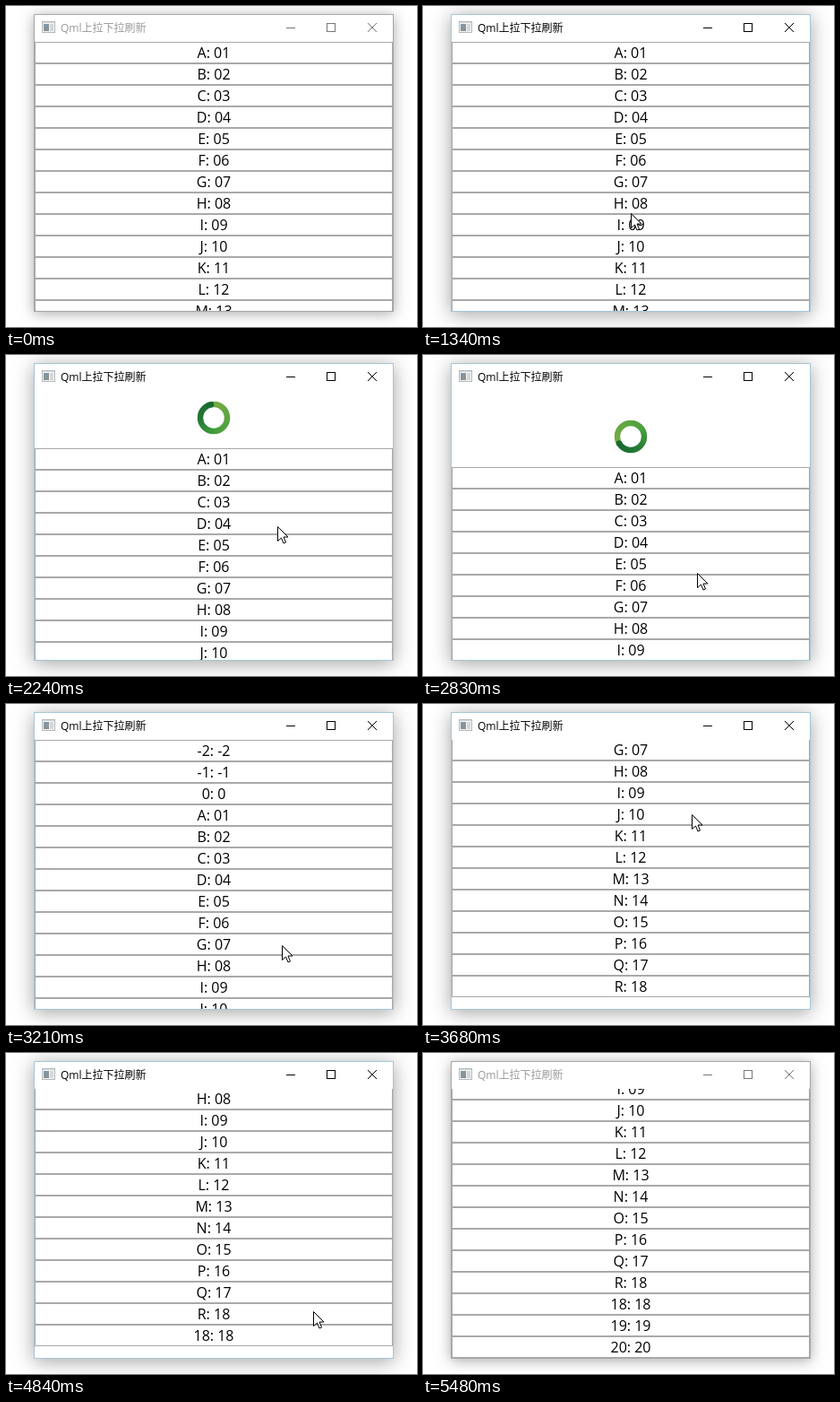
Recreate the animation shown at these times as an HTML page with a canvas. Size 459 px wide and 358 px high, loop 5530 ms.

```html
<!DOCTYPE html>
<html lang="zh">
<head>
<meta charset="utf-8">
<title>Pull to refresh</title>
<style>
html, body { margin: 0; width: 100%; height: 100%; overflow: hidden; background: #fff; }
canvas { display: block; }
</style>
</head>
<body>
<canvas id="stage" width="459" height="358"></canvas>
<script>
const ctx = document.getElementById('stage').getContext('2d');
const LOOP = 5530, ROW = 24, TOP = 40, BOTTOM = 340, MID = 232, PULL = 64;
const PREPEND = 3060, APPEND = 4760;

// Places where the pointer turns: time, x, y.
const TURNS = [
  [60, 325, 297], [610, 173, 58], [720, 190, 24], [1340, 232, 231],
  [1800, 255, 310], [2240, 303, 191], [3210, 308, 269], [3650, 300, 120],
  [3990, 286, 254], [4420, 300, 42], [4840, 343, 288], [5100, 352, 360]
];

const range = (n, make) => Array.from({ length: n }, (_, i) => make(i));
const letters = range(18, i =>
  String.fromCharCode(65 + i) + ': ' + String(i + 1).padStart(2, '0'));
const older = range(3, i => `${i - 2}: ${i - 2}`);
const newer = range(3, i => `${i + 18}: ${i + 18}`);

function ease(t, start, end) {
  const p = Math.min(1, Math.max(0, (t - start) / (end - start)));
  return p * p * (3 - 2 * p);
}

const bump = (t, start, end) => Math.sin(Math.PI * ease(t, start, end));

// Negative values pull the list down below the header spinner.
function scrollAt(t) {
  if (t < 3020) {
    return -PULL * ease(t, 1380, 1860) - 40 * bump(t, 1550, 2100) - 46 * bump(t, 2460, 2950);
  }
  if (t < APPEND) {
    return -PULL * (1 - ease(t, 3020, 3150)) + 272 * ease(t, 3270, 3850) + 14 * bump(t, 3650, 3980);
  }
  return 241 + 35 * ease(t, 4880, 4980);
}

function rowsAt(t) {
  const rows = t >= PREPEND ? older.concat(letters) : letters;
  const added = t >= 4900 ? 3 : t >= APPEND ? 1 : 0;
  return rows.concat(newer.slice(0, added));
}

function box(x, y, w, h, color) {
  ctx.fillStyle = color;
  ctx.fillRect(x, y, w, h);
}

function frame(x, y, w, h, color) {
  ctx.strokeStyle = color;
  ctx.strokeRect(x + 0.5, y + 0.5, w - 1, h - 1);
}

function line(x1, y1, x2, y2) {
  ctx.beginPath();
  ctx.moveTo(x1, y1);
  ctx.lineTo(x2, y2);
  ctx.stroke();
}

function drawIcon() {
  box(40, 17, 15, 13, '#b4b8ba');
  box(41, 18, 13, 11, '#f3f4f5');
  box(41, 18, 13, 1, '#d3dade');
  const shade = ctx.createLinearGradient(42, 20, 47, 28);
  shade.addColorStop(0, '#7f9bb0');
  shade.addColorStop(1, '#8f8f86');
  box(42, 20, 6, 8, shade);
  box(49, 20, 4, 8, '#d5d8da');
}

function drawWindow(active) {
  ctx.save();
  ctx.shadowColor = `rgba(0,0,0,${active ? 0.36 : 0.34})`;
  ctx.shadowBlur = active ? 20 : 14;
  ctx.shadowOffsetY = active ? 3 : 2;
  box(31, 9, 402, 332, '#fff');
  ctx.restore();
  frame(31, 9, 402, 332, active ? '#a5c6d8' : '#a6a6a6');
  drawIcon();

  ctx.font = '12px "Open Sans", "Noto Sans CJK SC", "Noto Sans CJK", sans-serif';
  ctx.textAlign = 'left';
  ctx.fillStyle = active ? '#000' : '#999';
  ctx.fillText('Qml上拉下拉刷新', 61, 29);

  frame(358, 19, 10, 10, active ? '#000' : '#777');
  line(313, 24.5, 323, 24.5);
  line(404, 19, 414, 29);
  line(414, 19, 404, 29);
}

function drawSpinner(y, t) {
  const degrees = (t - 2240) * 0.4257 - 102;
  const turn = degrees * Math.PI / 180;
  const radius = 15;
  const tint = ctx.createConicGradient(turn, MID, y);
  tint.addColorStop(0, '#79ad45');
  tint.addColorStop(0.5, '#48a03d');
  tint.addColorStop(0.75, '#267a35');
  tint.addColorStop(1, '#176a30');
  ctx.lineWidth = 6.5;
  ctx.strokeStyle = tint;
  ctx.beginPath();
  ctx.arc(MID, y, radius, 0, Math.PI * 2);
  ctx.stroke();
  // Rounded dark head.
  ctx.fillStyle = '#176a30';
  ctx.beginPath();
  ctx.arc(MID + radius * Math.cos(turn), y + radius * Math.sin(turn), 3.25, 0, Math.PI * 2);
  ctx.fill();
  ctx.lineWidth = 1;
}

function drawList(t) {
  const rows = rowsAt(t);
  const top = TOP - Math.round(scrollAt(t));
  const end = top + rows.length * ROW;

  ctx.save();
  ctx.beginPath();
  ctx.rect(32, TOP, 400, BOTTOM - TOP);
  ctx.clip();
  ctx.font = '500 16px "Open Sans", "Noto Sans", sans-serif';
  ctx.textAlign = 'center';
  rows.forEach((label, i) => {
    const y = top + i * ROW;
    frame(32, y, 400, ROW, '#a9a9a9');
    ctx.fillStyle = '#000';
    ctx.fillText(label, MID, y + 18);
  });
  if (top > TOP) drawSpinner(top - 34, t);
  // The footer appears only while more rows can load.
  if (end < BOTTOM && t < APPEND) drawSpinner(end + 38, t);
  ctx.restore();
}

function drawPointer(t) {
  const next = TURNS.findIndex(turn => turn[0] > t);
  if (next < 1) return;
  const a = TURNS[next - 1], b = TURNS[next];
  const p = ease(t, a[0], b[0]);
  const [x, y] = [1, 2].map(k => Math.round(a[k] + (b[k] - a[k]) * p) + 0.5);
  ctx.save();
  ctx.translate(x, y);
  const arrow = new Path2D('M0 0V16L4 12.5L6.5 18.5L9 17.5L6.5 11.5H11.5Z');
  ctx.fillStyle = '#fff';
  ctx.strokeStyle = '#000';
  ctx.fill(arrow);
  ctx.stroke(arrow);
  ctx.restore();
}

function draw(t) {
  ctx.lineWidth = 1;
  box(0, 0, 459, 358, '#fff');
  drawWindow(t >= 680 && t < 5480);
  drawList(t);
  drawPointer(t);
}

const begin = performance.now();
function tick() {
  draw((performance.now() - begin) % LOOP);
  requestAnimationFrame(tick);
}
tick();
</script>
</body>
</html>
```
